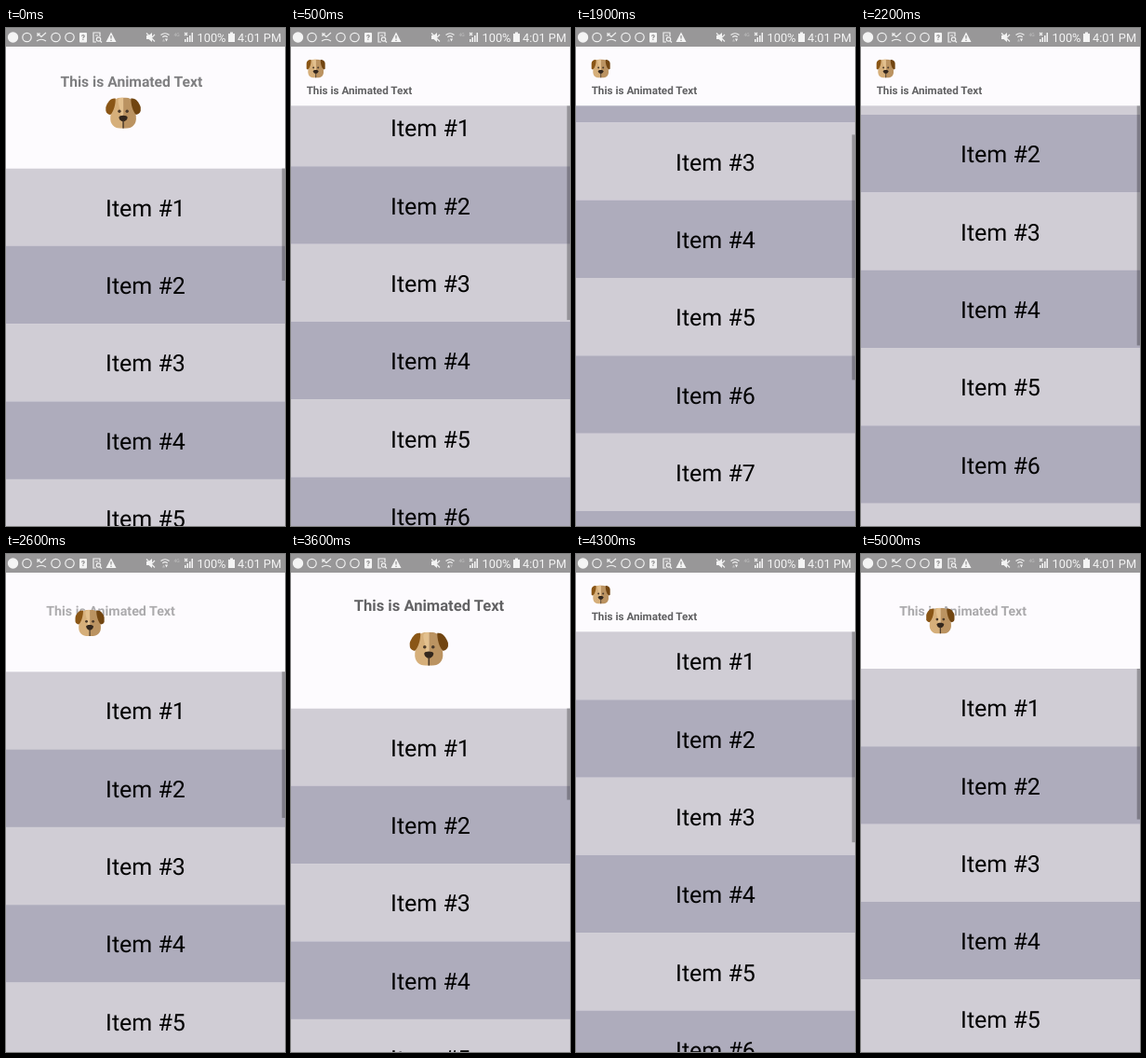
Recreate the animation shown at these times as an HTML page. Size 300 by 534 pixels, loop 5.1 s.

```html
<!DOCTYPE html>
<html lang="en">
<head>
<meta charset="utf-8">
<title>Collapsing header</title>
<style>
  html, body { margin: 0; height: 100%; overflow: hidden; background: #fdfbfe; }
  #stage { display: block; width: 100vw; height: 100vh; }
  text { font-family: Roboto, sans-serif; text-rendering: geometricPrecision; }
  #list text { font-size: 25px; text-anchor: middle; }
  #title { font-weight: 700; fill: #606062; }
  #status text { font-size: 12.8px; fill: #f4f4f4; }
  .line { fill: none; stroke: #f0f0f0; stroke-width: 1.2; }
  .solid { fill: #f4f4f4; }
  .dim { fill: #bcbbbc; }
</style>
</head>
<body>
<svg id="stage" viewBox="0 0 300 534">
  <g id="list"></g>
  <rect id="thumb" x="296.7" width="3.3" height="263" fill="#000" fill-opacity=".28"/>
  <rect id="header" width="300" fill="#fdfbfe"/>
  <text id="title">This is Animated Text</text>

  <svg id="dog" viewBox="0 0 42 36" preserveAspectRatio="xMidYMid slice">
    <path id="half" fill="#d6af7a" d="M21 0C14 0 10 2 9 6L6 22C5 32 11 36 18 36H21Z"/>
    <path fill="#bb9361" d="M21 0C28 0 32 2 33 6L36 22C37 32 31 36 24 36H21Z"/>
    <path fill="#e3c08e" d="M21 0C17 0 15 1 15 5C16 11 18 15 18 21H21Z"/>
    <path fill="#8a5616" d="M12 1C6 0 3 5 0 12C-.5 17 3 20 6 20C10 16 12 8 12 1Z"/>
    <path fill="#714511" d="M30 1C36 0 39 5 42 12C42.500 17 39 20 36 20C32 16 30 8 30 1Z"/>
    <circle cx="16.500" cy="16" r="1.800" fill="#4b3a2a"/>
    <circle cx="25.500" cy="16" r="1.800" fill="#4b3a2a"/>
    <path fill="#33271d" d="M16 23C16 20 26 20 26 23C26 26 23 28 21 28C19 28 16 26 16 23Z"/>
    <path stroke="#4b3a2a" stroke-width="1.600" d="M21 27V36"/>
  </svg>

  <g id="status">
    <rect width="300" height="20" fill="#989798"/>
    <circle class="solid" cx="7.500" cy="10" r="5.700"/>
    <circle class="line" cx="22.500" cy="10" r="4.700"/>
    <circle class="line" cx="53.500" cy="10" r="4.700"/>
    <circle class="line" cx="68.500" cy="10" r="4.700"/>
    <path class="line" d="M34 9V6L38 9.500L43 5M34 6H37"/>
    <path class="line" stroke-width="2" d="M33 14Q38 10.500 43 14"/>
    <rect class="solid" x="79" y="5" width="8" height="10.500" rx="1"/>
    <text x="81" y="13" style="font-size:8px;font-weight:700;fill:#858485">?</text>
    <path class="line" d="M97 15H94V5H101V9M96 8H99"/>
    <circle class="line" cx="99.500" cy="12" r="2.200"/>
    <path class="line" d="M101 13.500L103 15.500"/>
    <path class="solid" d="M113 4.500L118.500 15H107.500Z"/>
    <path stroke="#989798" stroke-width="1.300" d="M113 8V11.500M113 12.700V14"/>
    <path class="solid" d="M151 8H153.500L157 5V15L153.500 12H151Z"/>
    <path class="line" d="M151 5.500L160 14.500M160 7L157 10"/>
    <path class="line" d="M166.500 7.500Q171 4 175.500 7.500M168.300 9.700Q171 7.700 173.700 9.700"/>
    <path id="upload" d="M168 14.500L169.500 11.500L171 14.500Z"/>
    <path id="download" d="M171 11.500H174L172.500 14.500Z"/>
    <text x="180.500" y="9" style="font-size:5px;fill:#c4c3c4">4G</text>
    <path class="solid" d="M192 15V12H193.500V15ZM194.500 15V10H196V15ZM197 15V8H198.500V15ZM199.500 15V5H201V15Z"/>
    <path class="line" stroke-width="1" d="M192 5L195 8M195 5L192 8"/>
    <text x="205.500" y="14.600">100%</text>
    <path class="solid" d="M239 6H241V4.500H244V6H246V15H239Z"/>
    <text x="249" y="14.600">4:01 PM</text>
  </g>
</svg>
<script>
const LOOP = 5100, STEP = 100;
const ROW = 250 / 3, HEADER_MIN = ROW, HEADER_MAX = 2 * ROW, ITEMS = 11;
const SCROLLBAR_RATIO = 534 / (HEADER_MAX + ITEMS * ROW);

// [time in ms, scroll offset in px] of the finger's drag
const drag = [
  [0, 16.2], [500, 101.7], [1100, 228], [1400, 261], [1600, 261], [1900, 232],
  [2200, 157], [2600, 40.5], [3000, 0], [3500, 0], [3600, 1.2], [3800, 19],
  [4100, 67], [4300, 93.7], [4450, 100], [4700, 72], [5000, 43.7], [5100, 34]
];

const $ = id => document.getElementById(id);
const mix = (a, b, p) => a + (b - a) * p;

function set(id, attributes) {
  for (const name in attributes) $(id).setAttribute(name, attributes[name]);
}

const secant = i => (drag[i + 1][1] - drag[i][1]) / (drag[i + 1][0] - drag[i][0]);

function slope(i) {
  if (i === 0) return secant(0);
  if (i === drag.length - 1) return secant(i - 1);
  const a = secant(i - 1), b = secant(i);
  return a * b > 0 ? 2 * a * b / (a + b) : 0;
}

// Monotone cubic through the drag points
function scrollAt(time) {
  const i = drag.findIndex((point, n) => n < drag.length - 1 && time < drag[n + 1][0]);
  const [t0, s0] = drag[i], [t1, s1] = drag[i + 1];
  const span = t1 - t0, u = (time - t0) / span, v = 1 - u;
  return s0 * v * v * (1 + 2 * u) + s1 * u * u * (3 - 2 * u)
    + span * (slope(i) * u * v * v - slope(i + 1) * u * u * v);
}

function buildList() {
  let rows = "";
  for (let i = 0; i < ITEMS; i++) {
    const y = HEADER_MAX + i * ROW;
    rows += `<rect y="${y}" width="300" height="${ROW + 0.2}" fill="${i % 2 ? "#aeacbc" : "#d0cdd5"}"/>
      <text x="150" y="${y + ROW / 2 + 9.6}">Item #${i + 1}</text>`;
  }
  $("list").innerHTML = rows;
}

function draw(time) {
  const scroll = scrollAt(time);
  const height = Math.max(HEADER_MIN, HEADER_MAX - scroll);
  const open = (height - HEADER_MIN) / (HEADER_MAX - HEADER_MIN);

  set("list", { transform: `translate(0 ${-scroll})` });
  set("thumb", { y: scroll * SCROLLBAR_RATIO });
  set("header", { height });
  set("title", {
    x: mix(16.67, 68.5, open),
    y: mix(71, 60.9, open),
    "font-size": mix(11.67, 16.67, open),
    opacity: 0.5 + Math.abs(open - 0.5)
  });
  set("dog", {
    x: mix(16.67, 129.2, open),
    y: mix(33.5, 84.5, open),
    width: mix(20, 41.67, open),
    height: mix(20, 36.2, open)
  });

  const sending = time >= 3400 && time < 4300;
  set("upload", { class: sending ? "solid" : "dim" });
  set("download", { class: sending ? "dim" : "solid" });
}

function frame(now) {
  draw(Math.floor((now % LOOP) / STEP) * STEP);
  requestAnimationFrame(frame);
}

buildList();
draw(0);
requestAnimationFrame(frame);
</script>
</body>
</html>
```
